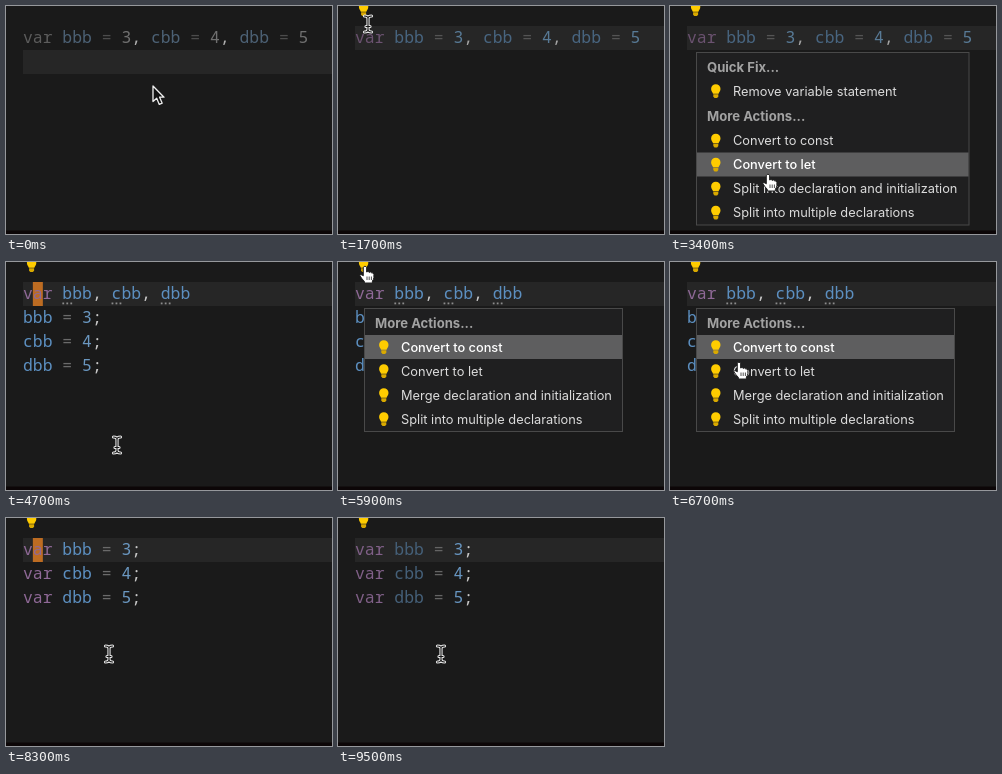
An HTML page for the animation above (9600 ms loop, 326 by 228 pixels).

```html
<!DOCTYPE html>
<html lang="en">
<head>
<meta charset="utf-8">
<title>Variable declaration actions</title>
<style>
  html, body { margin: 0; width: 100%; height: 100%; overflow: hidden; background: #1a1a1a; }
  svg { display: block; width: 326px; height: 228px; }
  .code { font: 500 16.4px "Noto Sans Mono", "DejaVu Sans Mono", monospace; white-space: pre; }
  .menu { font: 12.8px Inter, Roboto, sans-serif; fill: #dcdcdc; }
  .menu .head { font-size: 13.1px; font-weight: 700; fill: #a2a2a2; }
  .menu .active { font-weight: 500; fill: #fff; }
</style>
</head>
<body>
<svg viewBox="0 0 326 228">
  <defs>
    <g id="bulb">
      <path d="M-2.8 3.2C-3 1.5-4.7 .8-4.7-1.6A4.7 4.7 0 0 1 4.7-1.6C4.7 .8 3 1.5 2.8 3.2Z" fill="#fc0"/>
      <path d="M-2.5 3.7h5v2.4L1.3 7.4h-2.6L-2.5 6.1Z" fill="#d9a900"/>
    </g>
    <path id="arrow" d="M0 0V15.5L3.7 12.2 6.3 18.4 9.2 17.2 6.6 11.2H11Z"
      fill="#111" stroke="#eee" stroke-width="1.3" stroke-linejoin="round"/>
    <path id="beam" d="M-3.5-8Q0-8 0-5.5Q0-8 3.5-8M0-5.5V5.5M-3.5 8Q0 8 0 5.5Q0 8 3.5 8M-2 2.5H2"/>
    <g id="ibeam" fill="none" stroke-linecap="round">
      <use href="#beam" stroke="#e8e8e8" stroke-width="3.2"/>
      <use href="#beam" stroke="#161616" stroke-width="1.1"/>
    </g>
    <g id="hand" stroke="#222" stroke-width="1" stroke-linejoin="round">
      <path d="M-1.7 1.2Q0-1 1.6 1.2V6Q3.2 4.6 4.3 6.4Q5.9 5.2 6.8 7Q8.6 6.2 8.9 8.4V11.5Q8.7 13.5 7.4 15V17H-.6V15.4Q-3 13.2-5.2 9.6Q-4.6 7.6-1.7 9.8Z" fill="#fff"/>
      <path d="M2 10.5V14M4.2 10.5V14M6.4 10.5V14" fill="none" stroke-width=".8"/>
    </g>
  </defs>
  <rect width="326" height="228" fill="#1a1a1a"/>
  <rect y="224.5" width="326" height="3.5" fill="#0c0607"/>
  <g id="scene"></g>
</svg>
<script>
const LOOP = 9600, STEP = 100;
const LEFT = 17, CHAR = 9.84, LINE = 24;
const scene = document.getElementById('scene');

// Labels starting with # are section headings
const MENUS = [
  { from: 2300, to: 4100, right: 299, rows: [
    '#Quick Fix...', 'Remove variable statement', '#More Actions...', 'Convert to const', 'Convert to let',
    'Split into declaration and initialization', 'Split into multiple declarations'] },
  { from: 5800, to: 7900, right: 284.5, rows: [
    '#More Actions...', 'Convert to const', 'Convert to let',
    'Merge declaration and initialization', 'Split into multiple declarations'] }
];
const MENU_TOP = 46.5, ROW_TOP = 49, ROW = 24, SECTION_GAP = 1.5;

// Pointer path: time, x, y
const PATH = [
  [0, 147, 80], [100, 147, 80], [800, 31, 31], [1400, 31, 30], [1700, 30, 18], [2000, 27, 4],
  [3000, 27, 4], [3300, 95, 158], [3400, 98, 168], [3800, 111, 183], [4700, 111, 183], [5500, 27, 4],
  [6300, 27, 4], [6700, 69, 100], [7100, 100, 138], [7700, 104, 136], [7900, 103, 136], [LOOP, 103, 136]
];

// Syntax colours: keyword, name, operator, number, punctuation
const FADED = ['#5c5c5c', '#4c6175', '#4c4c4c', '#707070', '#b0b0b0'];
const UNUSED = ['#6b5270', '#486580', '#545454', '#587a96', '#a4a4a4'];
const BRIGHT = ['#8f6997', '#5c8fc0', '#6a6a6a', '#6a97c0', '#c8c8c8'];
const DIMMED = ['#806088', '#456079', '#646464', '#6795c0', '#c8c8c8'];

const clamp = v => Math.max(0, Math.min(1, v));
const between = (t, a, b) => t >= a && t < b;
const rect = (x, y, w, h, fill, extra = '') =>
  `<rect x="${x}" y="${y}" width="${w}" height="${h}" fill="${fill}" ${extra}/>`;
const use = (id, x, y) => `<use href="#${id}" x="${x}" y="${y}"/>`;

function pointer(t) {
  const i = Math.max(1, PATH.findIndex(p => p[0] >= t));
  const [t0, x0, y0] = PATH[i - 1], [t1, x1, y1] = PATH[i];
  const k = clamp((t - t0) / (t1 - t0));
  return [x0 + (x1 - x0) * k, y0 + (y1 - y0) * k];
}

function mix(from, to, k) {
  const rgb = c => [1, 3, 5].map(i => parseInt(c.slice(i, i + 2), 16));
  return from.map((c, i) => {
    const target = rgb(to[i]);
    return `rgb(${rgb(c).map((v, j) => Math.round(v + (target[j] - v) * k))})`;
  });
}

function codeLine(text, row, colors) {
  const spans = text.replace(/\w+|[=,;]/g, token => {
    const kind = token === 'var' ? 0 : /[a-z]/.test(token) ? 1 : token === '=' ? 2 : /\d/.test(token) ? 3 : 4;
    return `<tspan fill="${colors[kind]}">${token}</tspan>`;
  });
  return `<text class="code" x="${LEFT}" y="${37 + row * LINE}">${spans}</text>`;
}

function code(t) {
  if (t < 4200) {
    return codeLine('var bbb = 3, cbb = 4, dbb = 5', 0, mix(FADED, UNUSED, clamp((t - 1100) / 600)));
  }
  const lines = t < 8000
    ? ['var bbb, cbb, dbb', 'bbb = 3;', 'cbb = 4;', 'dbb = 5;']
    : ['var bbb = 3;', 'var cbb = 4;', 'var dbb = 5;'];
  const colors = mix(BRIGHT, DIMMED, clamp((t - 8300) / 400));
  let out = lines.map((line, i) => codeLine(line, i, colors)).join('');
  if (between(t, 4700, 8000)) {
    for (const col of [4, 9, 14])
      for (let i = 0; i < 3; i++) out += rect(LEFT + col * CHAR + i * 4, 40.5, 1.8, 1.8, '#8c8c8c');
  }
  return out;
}

function caret(t) {
  const spans = [[800, 2300], [4300, 5800], [7900, LOOP]];
  const on = spans.some(([a, b]) => between(t, a, b) && (t - a) % 1000 < 500);
  return on ? rect(LEFT + CHAR, 20, 10, LINE, '#bd6c22') : '';
}

function drawMenu({ rows, right }, t) {
  let bottom = ROW_TOP;
  const items = rows.map((label, i) => {
    const head = label[0] === '#';
    const top = bottom + (head && i ? SECTION_GAP : 0);
    bottom = top + ROW;
    return { label, head, top };
  });
  // Hover trails the pointer by one step; the first action has focus until then
  const y = pointer(t - STEP)[1];
  const actions = items.filter(item => !item.head);
  const active = actions.find(item => between(y, item.top, item.top + ROW)) || actions[0];

  let out = rect(26.5, MENU_TOP, right - 26.5, bottom + 0.5 - MENU_TOP, '#1f1f20', 'stroke="#494949"');
  for (const item of items) {
    const { label, head, top } = item, base = top + 16.6;
    if (head) {
      out += `<text class="head" x="37" y="${base}">${label.slice(1)}</text>`;
      continue;
    }
    if (item === active) out += rect(27, top, right - 27.5, ROW, '#5e5e5f');
    out += use('bulb', 45.8, top + 11.5) +
      `<text class="${item === active ? 'active' : ''}" x="63" y="${base}">${label}</text>`;
  }
  return `<g class="menu">${out}</g>`;
}

function render(t) {
  const menu = MENUS.find(m => between(t, m.from, m.to));
  const [x, y] = pointer(t);
  const shape = t < 100 ? 'arrow' : menu || y < 9 ? 'hand' : 'ibeam';
  scene.innerHTML =
    rect(LEFT, t < 800 ? 44 : 20, 309, LINE, '#262626') +
    caret(t) + code(t) +
    (t >= 1300 ? use('bulb', 25.6, 2.6) : '') +
    (menu ? drawMenu(menu, t) : '') +
    use(shape, x, y);
}

function tick() {
  render(Math.floor(performance.now() % LOOP / STEP) * STEP);
  requestAnimationFrame(tick);
}
tick();
</script>
</body>
</html>
```
